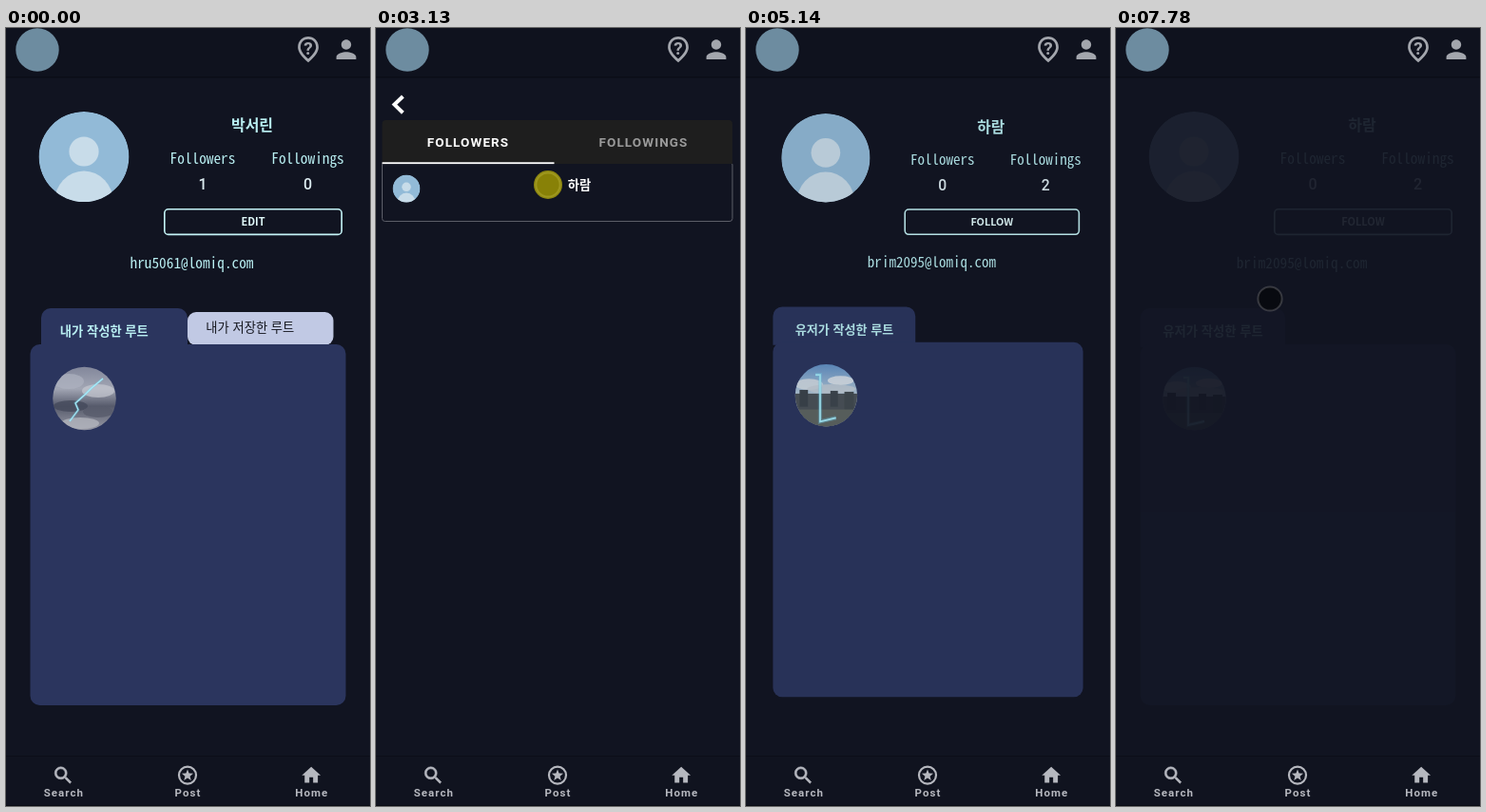
Animation of 383x819 px, one loop 7.99 s. Source, as an HTML page:

```html
<!DOCTYPE html>
<html lang="ko">
<head>
<meta charset="utf-8">
<title>Profile pages</title>
<style>
html, body { margin: 0; width: 100%; height: 100%; overflow: hidden; background: #111421; }
svg { display: block; width: 383px; height: 819px; }
text { text-anchor: middle; white-space: pre; }
.ko { font-family: "Noto Sans CJK KR", "Noto Sans KR", "Noto Sans CJK", sans-serif; }
.ro { font-family: Roboto, sans-serif; }
.mono { font-family: "Noto Sans Mono CJK KR", "Noto Sans Mono", monospace; }
.b { font-weight: 700; }
.m { font-weight: 500; }
</style>
</head>
<body>
<svg id="stage" viewBox="0 0 383 819" xmlns="http://www.w3.org/2000/svg"></svg>
<script>
const LOOP = 7990;
const CYAN = '#b9eff2', NAVY = '#2b355e', GREY = '#a3a6ad', PALE = '#b6b8bf';
const stage = document.getElementById('stage');

// Pick the size that gives the monospaced face a 7.65px advance.
const pen = document.createElement('canvas').getContext('2d');
pen.font = '100px "Noto Sans Mono CJK KR", "Noto Sans Mono", monospace';
const MONO = 765 / pen.measureText('0').width;

const text = (x, cy, size, cls, fill, str, extra = '') =>
  `<text x="${x}" y="${cy + size * 0.36}" font-size="${size}" class="${cls}" fill="${fill}" ${extra}>${str}</text>`;
const circle = (x, y, r, fill, extra = '') =>
  `<circle cx="${x}" cy="${y}" r="${r}" fill="${fill}" ${extra}/>`;
const rect = (x, y, w, h, r, fill, extra = '') =>
  `<rect x="${x}" y="${y}" width="${w}" height="${h}" rx="${r}" fill="${fill}" ${extra}/>`;
const icon = (x, y, s, d, fill = GREY, line = 0) =>
  `<path transform="translate(${x} ${y}) scale(${s})" fill="${fill}" stroke="${fill}" stroke-width="${line}" fill-rule="evenodd" d="${d}"/>`;

function avatar(x, y, r) {
  return `<g transform="translate(${x} ${y}) scale(${r / 47.5})" clip-path="url(#face)">
    ${circle(0, 0, 47.5, '#92bad7')}${circle(0, -5.5, 15.6, '#c8dce9')}
    <ellipse cx="0" cy="48" rx="31" ry="33" fill="#c8dce9"/></g>`;
}

const glow = (d, w) =>
  `<path d="${d}" fill="none" stroke="#6fd0ee" stroke-opacity=".35" stroke-width="${w * 2.4}"/>
   <path d="${d}" fill="none" stroke="#a5ecfa" stroke-width="${w}"/>`;
const blob = (x, y, rx, ry, fill, o = 1) =>
  `<ellipse cx="${x}" cy="${y}" rx="${rx}" ry="${ry}" fill="${fill}" opacity="${o}"/>`;

const clouds = rect(49, 356, 68, 68, 0, 'url(#storm)')
  + blob(66, 372, 16, 8, '#aeb2c0', .7) + blob(97, 382, 17, 7, '#c6c9d2', .7)
  + blob(68, 398, 18, 6, '#454a5c', .8) + blob(97, 404, 16, 6, '#585c6c', .8)
  + blob(78, 416, 20, 6, '#b2b4bd', .8)
  + glow('M102 369L90 379L83 386L73 395L76 402L67 414', 1.2);

const city = rect(49, 356, 68, 68, 0, 'url(#sky)')
  + blob(64, 378, 15, 6, '#d5dde4', .85) + blob(98, 374, 14, 5, '#dfe6eb', .85)
  + blob(88, 383, 26, 5, '#c3ced6', .8)
  + rect(49, 388, 68, 36, 0, '#4a5258') + rect(54, 384, 9, 18, 0, '#3b444b')
  + rect(87, 385, 8, 17, 0, '#3d464d') + rect(102, 386, 10, 20, 0, '#424a50')
  + rect(49, 405, 68, 19, 0, '#5d6461') + glow('M71 368H76V418L93 414', 1.8);

function profile(p) {
  return avatar(82, 135.5, 47.5)
    + text(259, 102.7, 16, 'ko b', CYAN, p.name)
    + text(207, 137.7, MONO, 'mono', CYAN, 'Followers')
    + text(317.5, 137.7, MONO, 'mono', CYAN, 'Followings')
    + text(207, 164.7, 16, 'ro m', '#dcebf0', p.followers)
    + text(317.5, 164.7, 16, 'ro m', '#dcebf0', p.followings)
    + rect(166.8, 190.8, 186.4, 26.6, 4, 'none', 'stroke="#c4f3f6" stroke-width="1.6"')
    + text(260, 204, 11, 'ko b', '#e2fbfc', p.button)
    + text(195.5, 247.6, MONO, 'mono', CYAN, p.mail)
    + p.tabs
    + rect(25.5, 333, 332, 380, 10, NAVY)
    + `<g clip-path="url(#thumb)">${p.photo}</g>`;
}

const tab = (x, w) =>
  `<path d="M${x} 336V305a10 10 0 0 1 10-10H${x + w - 10}a10 10 0 0 1 10 10V336z" fill="${NAVY}"/>`;

const mine = profile({
  name: '박서린', mail: 'hru5061@lomiq.com', followers: 1, followings: 0, button: 'EDIT', photo: clouds,
  tabs: rect(191, 299, 153.5, 35, 9, '#c1c9e4') + tab(37, 154)
    + text(103.3, 319.7, 13.3, 'ko b', CYAN, '내가 작성한 루트')
    + text(256.8, 315.7, 13.3, 'ko', '#15171f', '내가 저장한 루트')
});
const other = profile({
  name: '하람', mail: 'brim2095@lomiq.com', followers: 0, followings: 2, button: 'FOLLOW', photo: city,
  tabs: tab(25.5, 152.5) + text(102, 319.7, 13.3, 'ko b', CYAN, '유저가 작성한 루트')
});

const list = `<polyline points="28.3,72 19.4,80.6 28.3,89.2" fill="none" stroke="#fff" stroke-width="4"/>
  <g id="row">${rect(6.5, 141, 368.5, 62.5, 3, 'none', 'stroke="#5c5e68"')}
    ${avatar(32, 169, 14.5)}${text(214, 165, 13.3, 'ko b', '#fff', '하람')}</g>
  <path d="M6.5 143V101a4 4 0 0 1 4-4H371a4 4 0 0 1 4 4V143z" fill="#1e1e1e"/>
  ${text(97, 120.2, 13.5, 'ro b', '#fff', 'FOLLOWERS', 'letter-spacing="1.1"')}
  ${text(281.5, 120.2, 13.5, 'ro b', '#9b9b9b', 'FOLLOWINGS', 'letter-spacing="1.1"')}
  <rect id="bar" x="6.5" y="141.3" width="181" height="1.8" fill="#fff"/>`;

const star = Array.from({ length: 10 }, (_, i) => {
  const a = i * Math.PI / 5, r = i % 2 ? 2.7 : 6.4;
  return `${(191 + r * Math.sin(a)).toFixed(2)},${(786.8 - r * Math.cos(a)).toFixed(2)}`;
}).join(' ');

const label = (x, s) => text(x, 804.8, 11.5, 'ro b', PALE, s, 'letter-spacing="1.05"');

const chrome = rect(0, 0, 383, 51, 0, '#0f121e') + rect(0, 51, 383, 1.5, 0, '#0b0d17')
  + circle(33, 23, 22.7, '#6d8ca0')
  + circle(358, 23, 25, '#fff', 'id="ripple"')
  + icon(301.7, 6.3, 1.36, 'M12 2C7.8 2 4 5.22 4 10.2c0 3.32 2.67 7.25 8 11.8 5.33-4.55 8-8.48 8-11.8C20 5.22 16.2 2 12 2zm0 2c3.35 0 6 2.57 6 6.2 0 2.34-1.95 5.44-6 9.14-4.05-3.7-6-6.79-6-9.14C6 6.57 8.65 4 12 4z')
  + text(318, 21.2, 19, 'ro b', GREY, '?')
  + icon(342.4, 7.1, 1.3, 'M12 12c2.21 0 4-1.79 4-4s-1.79-4-4-4-4 1.79-4 4 1.79 4 4 4zm0 2c-2.67 0-8 1.34-8 4v2h16v-2c0-2.66-5.33-4-8-4z')
  + rect(0, 766, 383, 53, 0, '#10131f') + rect(0, 766, 383, 1, 0, '#0c0e18') + rect(0, 818, 383, 1, 0, '#090b13')
  + icon(48.2, 774.8, 1, 'M15.5 14h-.79l-.28-.27A6.47 6.47 0 0 0 16 9.5 6.5 6.5 0 1 0 9.5 16c1.61 0 3.09-.59 4.23-1.57l.27.28v.79l5 4.99L20.49 19l-4.99-5zm-6 0a4.5 4.5 0 1 1 0-9 4.5 4.5 0 0 1 0 9z', PALE, .6)
  + circle(191, 786.6, 9, 'none', `stroke="${PALE}" stroke-width="2.2"`)
  + `<polygon points="${star}" fill="${PALE}"/>`
  + icon(309.3, 774.8, .99, 'M10 20v-6h4v6h5v-8h3L12 3 2 12h3v8z', PALE)
  + label(60.8, 'Search') + label(191.5, 'Post') + label(321.8, 'Home');

const item = (y, s) =>
  text(305, y, 15, 'ro', '#fff', s, 'style="text-anchor:start" letter-spacing=".14"');

stage.innerHTML = `<defs>
  <clipPath id="face"><circle r="47.5"/></clipPath>
  <clipPath id="thumb"><circle cx="82.5" cy="390" r="33.3"/></clipPath>
  <linearGradient id="storm" x2="0" y2="1"><stop stop-color="#81869a"/><stop offset=".35" stop-color="#a2a6b4"/>
    <stop offset=".62" stop-color="#565a6b"/><stop offset="1" stop-color="#9a9ca8"/></linearGradient>
  <linearGradient id="sky" x2="0" y2="1"><stop stop-color="#5f8fc4"/><stop offset=".5" stop-color="#b7cad8"/></linearGradient>
  <filter id="soft" x="-20%" y="-20%" width="140%" height="150%"><feGaussianBlur stdDeviation="4"/></filter>
</defs>
${rect(0, 0, 383, 819, 0, '#111421')}
<g id="mine">${mine}</g><g id="list">${list}</g><g id="other">${other}</g>
${chrome}
<g id="menu">${rect(290, 52, 85, 106, 4, '#000', 'opacity=".5" filter="url(#soft)"')}
  ${rect(290, 47, 85, 106, 4, '#000')}${item(78, 'MyPage')}${item(124, 'Logout')}</g>
<g id="cursor">${circle(0, 0, 12.6, '#000', 'fill-opacity=".5" stroke="#909090" stroke-opacity=".33" stroke-width="2"')}
  ${circle(0, 0, 15, '#fff000', 'id="press" fill-opacity=".52"')}</g>`;

const el = {};
for (const id of ['mine', 'list', 'other', 'row', 'bar', 'ripple', 'menu', 'cursor', 'press'])
  el[id] = document.getElementById(id);

const clamp = v => Math.max(0, Math.min(1, v));
const smooth = v => v * v * (3 - 2 * v);
const within = (t, a, b) => t >= a && t < b;

// cubic-bezier(.25, .1, .25, 1)
function ease(p) {
  if (p <= 0) return 0;
  if (p >= 1) return 1;
  let lo = 0, hi = 1;
  for (let i = 0; i < 24; i++) {
    const u = (lo + hi) / 2, v = 1 - u;
    if (.75 * v * v * u + .75 * v * u * u + u * u * u < p) lo = u; else hi = u;
  }
  const u = lo, v = 1 - u;
  return .3 * v * v * u + 3 * v * u * u + u * u * u;
}
const enter = (t, start) => ease((t - start) / 1100);
const leave = (t, start) => 1 - ease((t - start) / 1030);

// Each visit of the pointer: [time, x, y]
const visits = [
  [[590, 336, 228], [1060, 204, 147], [1520, 204, 147], [1580, 205, 148], [2200, 218, 178],
   [2740, 181, 165], [3270, 181, 165], [3560, 243, 198], [3820, 258, 240]],
  [[5810, 49, 132], [6020, 368, 26], [6380, 368, 26], [6860, 334, 89], [7090, 334, 89], [7780, 162, 285], [LOOP, 162, 285]]
];
const presses = [[1380, 1520], [3130, 3270], [6220, 6350], [6960, 7090]];

function pointer(t) {
  const path = visits.find(v => within(t, v[0][0], v[v.length - 1][0]));
  if (!path) return null;
  const i = path.findIndex(k => k[0] > t), a = path[i - 1], b = path[i];
  const p = smooth((t - a[0]) / (b[0] - a[0]));
  return [a[1] + (b[1] - a[1]) * p, a[2] + (b[2] - a[2]) * p];
}

function show(node, opacity) {
  node.setAttribute('display', opacity > 0 ? 'inline' : 'none');
  node.setAttribute('opacity', opacity);
}

function draw(t) {
  show(el.mine, t < 1520 ? 1 : 0);

  show(el.list, within(t, 1520, 4430) ? leave(Math.min(t, 4090), 3270) : 0);
  el.list.setAttribute('transform', `translate(0 ${100 * (1 - enter(t, 1560))})`);
  show(el.bar, t >= 1640 ? 1 : 0);
  show(el.row, t >= 1710 ? 1 : 0);

  const p = enter(t, 4430), s = .8 + .2 * p;
  show(el.other, t < 7090 ? p : leave(Math.min(t, 7780), 7090));
  el.other.setAttribute('transform', `translate(191.5 207) scale(${s}) translate(-191.5 -207)`);

  const open = smooth(clamp((t - 6285) / 230)), shut = clamp((t - 7090) / 200);
  const m = .75 + .25 * open;
  show(el.menu, open * (1 - shut));
  el.menu.setAttribute('transform', `translate(375 47) scale(${m} ${m * m}) translate(-375 -47)`);
  const grow = smooth(clamp((t - 6200) / 220));
  show(el.ripple, .15 * grow * (1 - shut));
  el.ripple.setAttribute('r', 12 + 13 * grow);

  const at = pointer(t);
  show(el.cursor, at ? 1 : 0);
  if (at) el.cursor.setAttribute('transform', `translate(${at[0]} ${at[1]})`);
  show(el.press, presses.some(([a, b]) => within(t, a, b)) ? 1 : 0);
}

const began = performance.now();
function tick() {
  draw((performance.now() - began) % LOOP);
  requestAnimationFrame(tick);
}
tick();
</script>
</body>
</html>
```
